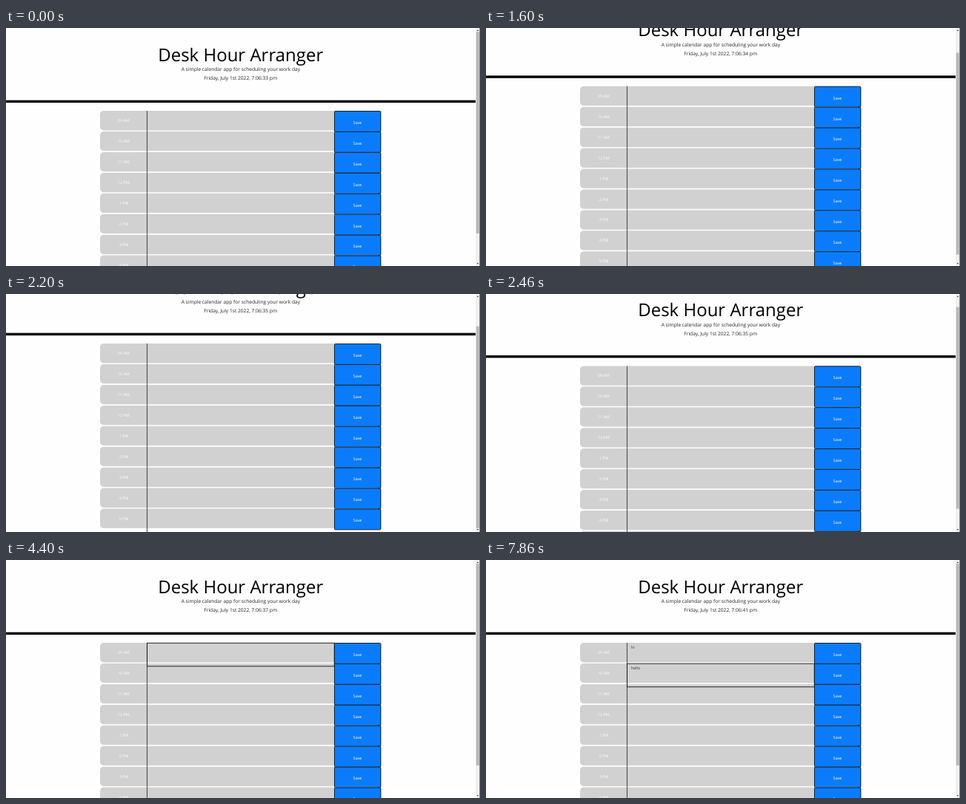
Recreate the animation shown at these times as an HTML page. Size 640 px wide and 322 px high, loop 8000 ms.

```html
<!DOCTYPE html>
<html lang="en">
<head>
<meta charset="utf-8">
<title>Desk Hour Arranger</title>
<style>
  html, body { margin: 0; width: 100%; height: 100%; overflow: hidden; background: #fefefe; }
  svg { display: block; width: 640px; height: 322px; }
  text { font: 5.33px "Open Sans", "Noto Sans", sans-serif; text-rendering: geometricPrecision; }
  .mid { text-anchor: middle; }
  .lead { font-size: 6.67px; fill: #212529; }
  .white { fill: #fff; }
  .note { fill: #333; }
  .line { stroke: #111; stroke-width: .9; fill: none; }
</style>
</head>
<body>
<svg id="stage" viewBox="0 0 640 322"></svg>
<script>
const LOOP = 8000, PITCH = 27.93, TOP = 112.1, MAX_SCROLL = 45;
const LEFT = 127, NOTE = 190.5, SAVE = 443.3, RIGHT = 506;
const HOURS = ['09 AM', '10 AM', '11 AM', '12 PM', '1 PM', '2 PM', '3 PM', '4 PM', '5 PM'];

// Keyboard and focus: time, row, text of that row
const EDITS = [
  [2800, 0, ''], [4460, 0, 'h'], [4600, 0, 'hi'],
  [5730, 1, ''], [5930, 1, 'b'], [6600, 1, ''], [6800, 1, 'h'],
  [7060, 1, 'he'], [7200, 1, 'hell'], [7330, 1, 'hello']
];
const BLINK = 530;

const stage = document.getElementById('stage');

function add(parent, tag, attrs, content = '') {
  const el = document.createElementNS('http://www.w3.org/2000/svg', tag);
  for (const key in attrs) el.setAttribute(key, attrs[key]);
  el.textContent = content;
  return parent.appendChild(el);
}
const rect = (parent, x, y, width, height, more) =>
  add(parent, 'rect', { x, y, width, height, ...more });
const label = (parent, x, y, cls, content, more) =>
  add(parent, 'text', { x, y, class: cls, ...more }, content);

// Page
const page = add(stage, 'g');
label(page, 316.7, 44.8, 'mid', 'Desk Hour Arranger', { style: 'font-size:24px' });
label(page, 316.9, 58.4, 'mid lead', 'A simple calendar app for scheduling your work day');
const clock = label(page, 316.7, 70.4, 'mid lead', '');
rect(page, 0, 97.7, 634, 3.4);

const rowY = i => TOP + i * PITCH;
HOURS.forEach((hour, i) => {
  const y = rowY(i);
  rect(page, LEFT, y, RIGHT - LEFT, 26.3, { rx: 5, fill: '#d1d1d1' });
  label(page, 159, y + 15.1, 'mid white', hour);
  rect(page, SAVE + .2, y + .4, RIGHT - SAVE - .2, PITCH, { rx: 1.3, class: 'line', style: 'fill:#0a7cfb' });
  label(page, 474.6, y + 17.8, 'mid white', 'Save');
});
add(page, 'path', { d: `M${NOTE} ${TOP}V${rowY(8) + 32}`, class: 'line', style: 'stroke:#333' });
const notes = [0, 1].map(i => label(page, 196, rowY(i) + 8, 'note', ''));
const focus = rect(page, NOTE, 0, SAVE - NOTE, 31.5, { class: 'line' });
const caret = rect(page, 0, 0, .7, 7.2);

// Scrollbar
rect(stage, 634, 0, 6, 322, { fill: '#f1f1f1' });
const thumb = rect(stage, 634.8, 5, 4, 273, { fill: '#b9b9b9' });
rect(stage, 639.3, 0, .7, 322, { fill: '#666' });
add(stage, 'path', { d: 'M635.5 4l1.4 -1.8 1.4 1.8zM635.5 318l1.4 1.8 1.4 -1.8z', fill: '#444' });

function ease(t, from, to, power = 1) {
  const u = Math.min(1, Math.max(0, (t - from) / (to - from))) ** power;
  return u * u * (3 - 2 * u);
}

function scrollAt(t) {
  return 33.3 * ease(t, 1290, 1600) + (MAX_SCROLL - 33.3) * ease(t, 1620, 2060)
    - MAX_SCROLL * ease(t, 2200, 2660, .85);
}

function draw(t) {
  const scroll = scrollAt(t);
  page.setAttribute('transform', `translate(0 ${-scroll})`);
  thumb.setAttribute('y', 5 + scroll * .86);

  const seconds = 33 + Math.floor((t + (t < 730 ? 270 : 340)) / 1000);
  clock.textContent = `Friday, July 1st 2022, 7:06:${seconds} pm`;

  const done = EDITS.filter(edit => edit[0] <= t);
  notes.forEach((note, i) => {
    const last = done.filter(edit => edit[1] === i).pop();
    note.textContent = last ? last[2] : '';
  });

  const current = done.pop();
  focus.style.display = current ? '' : 'none';
  const lit = current && Math.floor((t - current[0]) / BLINK) % 2 === 0;
  caret.style.display = lit ? '' : 'none';
  if (!current) return;
  const [, row, typed] = current;
  focus.setAttribute('y', rowY(row) + .2);
  caret.setAttribute('x', 196 + (typed ? notes[row].getComputedTextLength() : 0));
  caret.setAttribute('y', rowY(row) + 2.4);
}

function frame() {
  draw(performance.now() % LOOP);
  requestAnimationFrame(frame);
}
frame();
</script>
</body>
</html>
```
